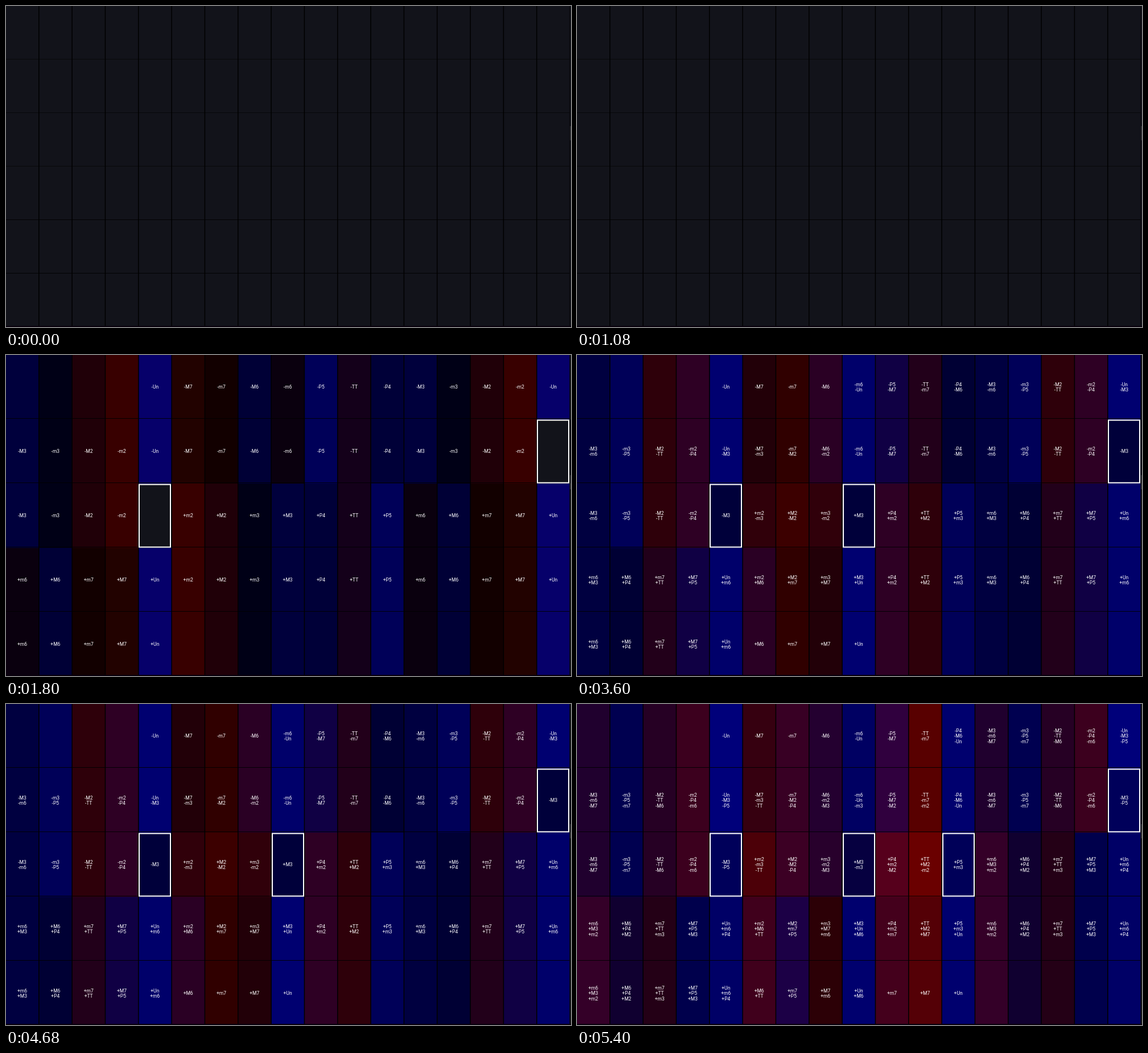
Write an HTML page that moves like this. It is 993 px wide and 564 px high and loops after 7200 ms.

```html
<!DOCTYPE html>
<html lang="en">
<head>
<meta charset="utf-8">
<title>Interval grid</title>
<style>
  html, body { margin: 0; width: 100%; height: 100%; overflow: hidden; background: #12131a; }
  svg { display: block; width: 993px; height: 564px; }
  text { font: 8.5px Roboto, "Open Sans", sans-serif; fill: #fff; text-anchor: middle; }
  .step { visibility: hidden; animation: show 7200ms step-end infinite; }
  @keyframes show {
    0% { visibility: visible; }
    25%, 100% { visibility: hidden; }
  }
</style>
</head>
<body>
<svg id="stage" viewBox="0 0 993 564" xmlns="http://www.w3.org/2000/svg"></svg>
<script>
const COLS = 17, COL_W = 58.33, ROW_H = 113, ROOT_COL = 4, IDLE = '#12131a';
const NAMES = 'Un m2 M2 m3 M3 P4 TT P5 m6 M6 m7 M7'.split(' ');
const hexes = s => s.split(' ').map(h => '#' + h);

// Colours by semitone above the root: below the chord, inside it, above it.
const single = hexes('06006a 380000 200008 000016 00003c 000038 14001a 000058 0a000e 000036 120000 220200');
const pair = hexes('000070 220008 300000 2a0024 00006a 100044 22001a 000034 000040 000058 2e000a 2e0024');
const CHORDS = [
  { notes: [0],
    below: single.map((_, i) => single[(12 - i) % 12]),
    inside: [IDLE],
    above: single },
  { notes: [0, 4],
    below: pair,
    inside: hexes('00003a 30000a 3c0000 30000a 00003a'),
    above: pair.map((_, i) => pair[(16 - i) % 12]) },
  { notes: [0, 4, 7],
    below: hexes('00007a 360010 380024 240030 000062 30003e 580000 00006e 20002e 000050 260024 3c001e'),
    inside: hexes('00005a 4c0008 3c0024 28002c 060040 56001c 6a0000 000058'),
    above: hexes('000066 40001c 1c0046 2c0006 00006e 44001c 540006 00006e 340028 100030 240016 00004c') }
];

const stage = document.getElementById('stage');

function add(parent, tag, attrs, content) {
  const el = document.createElementNS(stage.namespaceURI, tag);
  for (const k in attrs) el.setAttribute(k, attrs[k]);
  if (content) el.textContent = content;
  parent.append(el);
  return el;
}

const box = (parent, x, y, width, height, fill, more) =>
  add(parent, 'rect', { x, y, width, height, fill, ...more });

function addStep(i) {
  const g = add(stage, 'g', { class: 'step' });
  g.style.animationDelay = (i - 4) * 1800 + 'ms';
  return g;
}

function drawLines(g, rowH, rows, offset) {
  for (let r = 1; r <= rows; r++) {
    const y = Math.min(563, Math.round(rowH * r - offset));
    box(g, 0, y, 991, 1, '#000', { opacity: rows === 6 && r < 4 ? 0.6 : 0.9 });
  }
  for (let c = 1; c <= COLS; c++) box(g, COL_W * c - 1.3, 0, 1.5, 564, '#000');
}

function interval(d) {
  if (!d || Math.abs(d) > 24) return '';
  return (d < 0 ? '-' : '+') + NAMES[Math.abs(d) % 12];
}

function cellColor(chord, n) {
  if (n >= 0 && n < chord.inside.length) return chord.inside[n];
  return (n < 0 ? chord.below : chord.above)[(n + 36) % 12];
}

function drawChord(g, chord) {
  const marks = [];
  for (let r = 0; r < 5; r++) {
    for (let c = 0; c < COLS; c++) {
      const n = c - ROOT_COL + 12 * (r - 2);
      const x = c * COL_W, y = r * ROW_H;
      box(g, x, y, COL_W, ROW_H, cellColor(chord, n));
      if (chord.notes.includes(n)) marks.push([x, y]);

      const labels = chord.notes.map(m => interval(n - m)).filter(Boolean);
      labels.forEach((s, i) => add(g, 'text', {
        x: x + 28.5,
        y: y + 59.4 + (i - (labels.length - 1) / 2) * 9.7
      }, s));
    }
  }
  drawLines(g, ROW_H, 5, 2);
  for (const [x, y] of marks) {
    box(g, Math.round(x) + 1, y + 1.5, 55, 110, 'none', { stroke: '#fff', 'stroke-width': 2 });
  }
}

const idle = addStep(0);
box(idle, 0, 0, 991, 564, IDLE);
drawLines(idle, 94.1, 6, 1.1);
CHORDS.forEach((chord, i) => drawChord(addStep(i + 1), chord));

// Fixed right and bottom edges
box(stage, 991, 0, 2, 564, IDLE);
box(stage, 991, 211, 2, 25, '#2c2d32');
box(stage, 0, 562, 993, 2, '#08000c');
</script>
</body>
</html>
```
